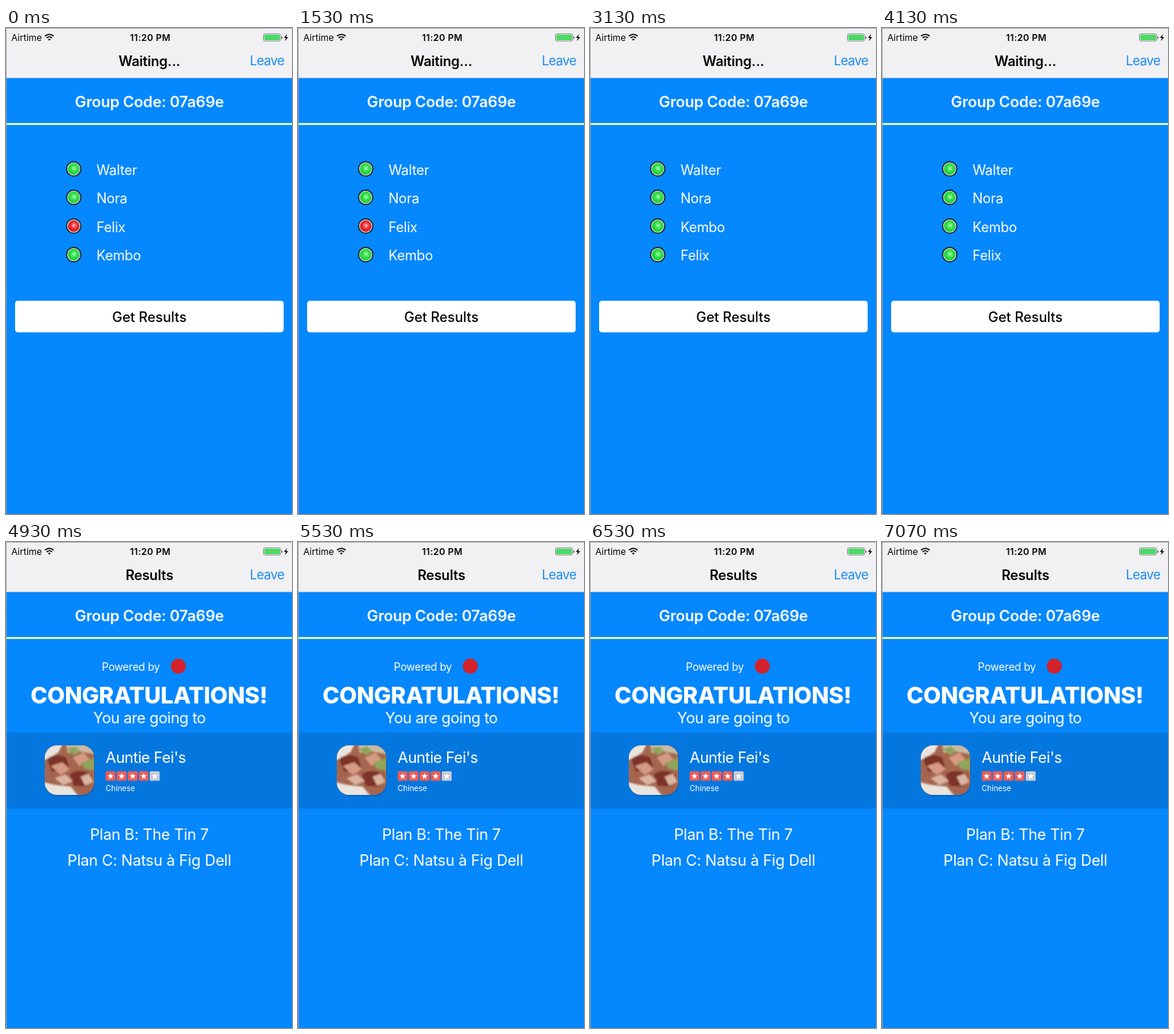
These frames come from a looping animation (376 by 638 pixels, 7140 ms). An HTML page:

```html
<!DOCTYPE html>
<html lang="en">
<head>
<meta charset="utf-8">
<title>Group results</title>
<style>
  html, body { margin: 0; width: 100%; height: 100%; overflow: hidden; background: #0587fd; }
  svg { display: block; width: 100%; height: 100%; }
  text { font-family: Inter, Roboto, sans-serif; font-size: 18px; letter-spacing: -.2px; fill: #fff; }
  .mid { text-anchor: middle; }
  .dark { fill: #050505; }
  .semi { font-weight: 600; }
  .small { font-size: 12px; letter-spacing: 0; }
  .big { font-size: 20px; }

  .loop { animation: 7140ms step-end infinite; }
  .before { animation-name: before; }
  .after { animation-name: after; }
  .slide { animation: 7140ms linear infinite; }
  .old { animation-name: old; }
  .new { animation-name: new; }
  .old-title { animation-name: old-title; }
  .new-title { animation-name: new-title; }

  @keyframes before { 0% { opacity: 1 } 32.63%, 100% { opacity: 0 } }
  @keyframes after { 0% { opacity: 0 } 32.63%, 100% { opacity: 1 } }
  @keyframes old {
    0% { transform: none }
    59.8% { transform: none; animation-timing-function: cubic-bezier(.2, .8, .3, 1) }
    64.7%, 100% { transform: translateX(-113px) }
  }
  @keyframes new {
    0% { transform: translateX(376px) }
    59.8% { transform: translateX(376px); animation-timing-function: cubic-bezier(.2, .8, .3, 1) }
    64.7%, 100% { transform: none }
  }
  @keyframes old-title {
    0% { opacity: 1; transform: none }
    59.8% { opacity: 1; transform: none; animation-timing-function: ease-out }
    64.7%, 100% { opacity: 0; transform: translateX(-110px) }
  }
  @keyframes new-title {
    0% { opacity: 0; transform: translateX(130px) }
    59.8% { opacity: 0; transform: translateX(130px); animation-timing-function: ease-out }
    64.7%, 100% { opacity: 1; transform: none }
  }
</style>
</head>
<body>
<svg viewBox="0 0 376 638" preserveAspectRatio="none">
  <defs>
    <radialGradient id="green" cx=".53" cy=".45" r=".55">
      <stop offset="0" stop-color="#b4ffb4"/><stop offset=".45" stop-color="#35e04c"/><stop offset="1" stop-color="#0fc92c"/>
    </radialGradient>
    <radialGradient id="red" cx=".53" cy=".45" r=".55">
      <stop offset="0" stop-color="#ffc0c0"/><stop offset=".45" stop-color="#ee3038"/><stop offset="1" stop-color="#d80d18"/>
    </radialGradient>
    <filter id="soft"><feGaussianBlur stdDeviation="1.2"/></filter>
    <g id="lamp">
      <circle r="10.2" fill="#10202a"/>
      <circle r="8.1" stroke="#c4ddc8" stroke-width="1.2"/>
    </g>
    <g id="star">
      <rect width="13" height="12.6" rx="1.5"/>
      <path d="M6.5 2.2 7.6 5.1 10.7 5.2 8.3 7.1 9.1 10.1 6.5 8.4 3.9 10.1 4.7 7.1 2.3 5.2 5.4 5.1Z" fill="#fff"/>
    </g>
    <clipPath id="tile"><rect x="51" y="267" width="65" height="65" rx="16"/></clipPath>
    <g id="header">
      <rect y="65" width="376" height="573" fill="#0587fd"/>
      <text class="mid semi big" x="188.5" y="104">Group Code: 07a69e</text>
      <rect y="124.8" width="376" height="2.4" fill="#f6ffaa"/>
    </g>
  </defs>

  <g class="slide old">
    <use href="#header"/>
    <use href="#lamp" x="89" y="185" fill="url(#green)"/><text x="119" y="192.5">Walter</text>
    <use href="#lamp" x="89" y="222.3" fill="url(#green)"/><text x="119" y="230">Nora</text>
    <g class="loop before">
      <use href="#lamp" x="89" y="260" fill="url(#red)"/><text x="119" y="267.5">Felix</text>
      <use href="#lamp" x="89" y="297.5" fill="url(#green)"/><text x="119" y="305">Kembo</text>
    </g>
    <g class="loop after">
      <use href="#lamp" x="89" y="260" fill="url(#green)"/><text x="119" y="267.5">Kembo</text>
      <use href="#lamp" x="89" y="297.5" fill="url(#green)"/><text x="119" y="305">Felix</text>
    </g>
    <rect x="12" y="358" width="353" height="41.5" rx="4" fill="#fff"/>
    <text class="mid dark" x="188.5" y="385.5" font-weight="500" style="letter-spacing:0">Get Results</text>
  </g>

  <g class="slide new">
    <use href="#header"/>
    <text x="126" y="169" style="font-size:14px">Powered by</text>
    <circle cx="226.5" cy="163" r="10" fill="#d3222b"/>
    <text class="mid" x="188" y="212" font-weight="800" style="font-size:30px;letter-spacing:-.3px">CONGRATULATIONS!</text>
    <text class="mid big" x="188.5" y="238" style="letter-spacing:-.4px">You are going to</text>
    <rect y="250" width="376" height="100" fill="#0477df"/>
    <rect x="52" y="269" width="65" height="65" rx="16" fill="#0368c6"/>
    <g clip-path="url(#tile)">
      <path d="M51 267h65v65H51z" fill="#a5664f"/>
      <g filter="url(#soft)">
        <path d="M45 260h32l-8 16-14 9-10 2zM45 314l20 5 20 2 14 17H45z" fill="#e9e4dd"/>
        <path d="M78 260h45v20l-25-5-17 2z" fill="#c9b9a2"/>
        <path d="M54 285q10-9 25-2l4 13-22 6zM84 305q14-9 29 1l-6 15-18-1z" fill="#7c3128"/>
        <path d="M59 294l15-5 10 9-12 8zM88 283l14-7 9 11-15 7z" fill="#d59a83"/>
        <path d="M80 272l10-4 8 7-8 5zM98 290l18-7v17l-12-2z" fill="#91a45a"/>
        <path d="M64 310l14-5 10 9-13 5zM98 308l11-4 6 11-11 5z" fill="#dab4a0"/>
      </g>
    </g>
    <text class="big" x="131" y="290" style="letter-spacing:-.4px">Auntie Fei's</text>
    <g fill="#ee5b58">
      <use href="#star" x="131" y="301"/><use href="#star" x="145.5" y="301"/>
      <use href="#star" x="160" y="301"/><use href="#star" x="174.5" y="301"/>
      <use href="#star" x="189" y="301" fill="#c5ccd5"/>
    </g>
    <text x="131" y="326.5" style="font-size:10px;letter-spacing:0">Chinese</text>
    <text class="mid big" x="188.5" y="391">Plan B: The Tin 7</text>
    <text class="mid big" x="188.5" y="425">Plan C: Natsu à Fig Dell</text>
  </g>

  <rect width="376" height="66" fill="#f1f1f3"/>
  <rect y="65" width="376" height="1" fill="#b5c5d8"/>
  <text class="small dark" x="7" y="17">Airtime</text>
  <g fill="none" stroke="#111" stroke-width="1.7">
    <path d="M51.3 10.7a8.2 8.2 0 0 1 11.4 0M53.5 13.1a5 5 0 0 1 7 0"/>
    <path d="M57 16.7l-1.8-1.9a2.6 2.6 0 0 1 3.6 0z" fill="#111" stroke="none"/>
  </g>
  <text class="small mid semi dark" x="189.7" y="16.7" style="letter-spacing:.3px">11:20 PM</text>
  <rect x="338.5" y="7.7" width="22.5" height="9.4" rx="1.8" fill="#f1f1f3" stroke="#777" stroke-width=".8"/>
  <rect x="339.5" y="8.7" width="20.5" height="7.4" rx="1" fill="#4cd964"/>
  <path d="M362 11v3.4q1.4-.4 1.4-1.7T362 11z" fill="#555"/>
  <path d="M369.5 8l-4.2 5h2.5l-1.2 4.2 4.4-5.2h-2.5z" fill="#111"/>
  <text class="slide old-title mid semi dark" x="188.5" y="49.5">Waiting...</text>
  <text class="slide new-title mid semi dark" x="188.5" y="49.5">Results</text>
  <text x="366" y="49" text-anchor="end" style="font-size:17px;letter-spacing:-.5px;fill:#1a8cf5">Leave</text>
  <path d="M0 .5h376M.5 0v638" stroke="#9fa6ad" stroke-opacity=".75" fill="none"/>
</svg>
</body>
</html>
```
